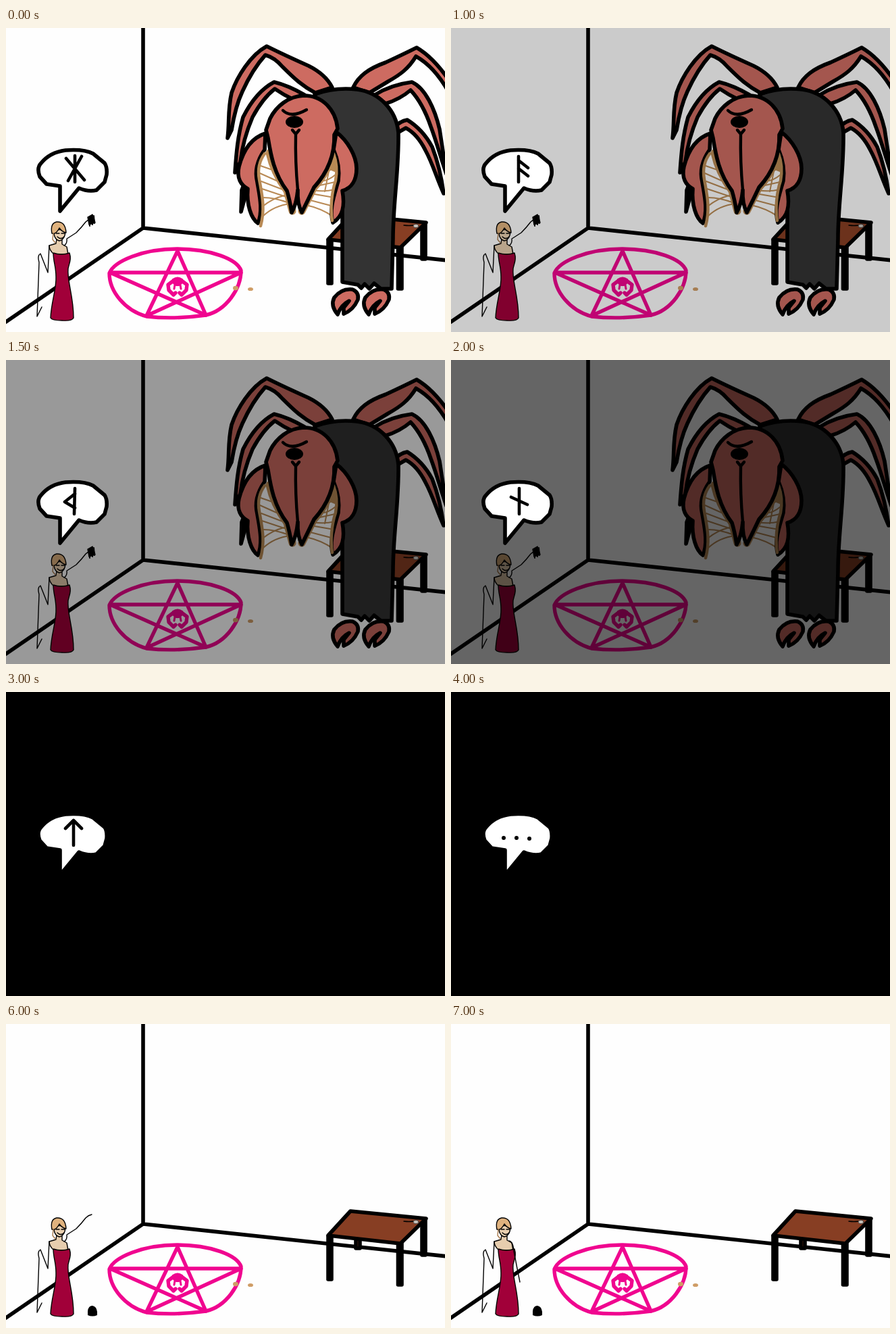
An HTML page for the animation above (8 s loop, 650 by 450 pixels).

```html
<!DOCTYPE html>
<html lang="en">
<head>
<meta charset="utf-8">
<title>Summoning room</title>
<style>
html, body { margin: 0; width: 100%; height: 100%; overflow: hidden; background: #fff; }
svg { display: block; width: 650px; height: 450px; }
path, ellipse { stroke-linecap: round; stroke-linejoin: round; }
.ink { stroke: #000; stroke-width: 5.6; fill: none; }
.thin { stroke: #000; stroke-width: 1.4; fill: none; }
.flesh { fill: #cd6b61; }
.wood { fill: #873e23; }
.pink { stroke: #f0058f; stroke-width: 5.4; fill: none; }
.web { stroke: #b98a55; stroke-width: 2; fill: none; }
.rune { stroke: #000; stroke-width: 4.6; fill: none; }

.monster, .bubble, .dim, .held, .raised, .dropped, .lowered, .rune, .dots { animation: 8s step-end infinite; }
.monster, .bubble, .held { animation-name: before6; }
.dropped { animation-name: after6; }
.raised { animation-name: before7; }
.lowered { animation-name: after7; }
.dim { animation-name: dim; }
.r1 { animation-name: r1; }
.r2 { animation-name: r2; }
.r3 { animation-name: r3; }
.r4 { animation-name: r4; }
.r5 { animation-name: r5; }
.r6 { animation-name: r6; }
.dots { animation-name: dots; }
@keyframes before6 { 0% { opacity: 1 } 75%, to { opacity: 0 } }
@keyframes after6 { 0% { opacity: 0 } 75%, to { opacity: 1 } }
@keyframes before7 { 0% { opacity: 1 } 87.5%, to { opacity: 0 } }
@keyframes after7 { 0% { opacity: 0 } 87.5%, to { opacity: 1 } }
@keyframes dim {
  0% { opacity: 0 } 12.5% { opacity: .2 } 18.75% { opacity: .4 } 25% { opacity: .6 }
  31.25% { opacity: .8 } 37.5% { opacity: 1 } 75%, to { opacity: 0 }
}
@keyframes r1 { 0% { opacity: 1 } 12.5%, to { opacity: 0 } }
@keyframes r2 { 0% { opacity: 0 } 12.5% { opacity: 1 } 18.75%, to { opacity: 0 } }
@keyframes r3 { 0% { opacity: 0 } 18.75% { opacity: 1 } 25%, to { opacity: 0 } }
@keyframes r4 { 0% { opacity: 0 } 25% { opacity: 1 } 31.25%, to { opacity: 0 } }
@keyframes r5 { 0% { opacity: 0 } 31.25% { opacity: 1 } 37.5%, to { opacity: 0 } }
@keyframes r6 { 0% { opacity: 0 } 37.5% { opacity: 1 } 50%, to { opacity: 0 } }
@keyframes dots { 0% { opacity: 0 } 50%, to { opacity: 1 } }
</style>
</head>
<body>
<svg viewBox="0 0 650 450">
  <rect width="650" height="450" fill="#fefefe"/>

  <!-- room -->
  <path class="ink" d="M203 -4V296L653 344M203 296L0 435"/>

  <!-- table -->
  <g class="ink wood">
    <path d="M518 318H524V332H518Z"/>
    <path d="M616 290H621V342H616Z"/>
    <path d="M477 314H482V378H477Z"/>
    <path d="M580.5 325H586V386H580.5Z"/>
    <path d="M510 277L622 288L584 325L477 313Z"/>
  </g>
  <path class="thin" d="M589 292Q597 293 603 292"/>
  <ellipse cx="607" cy="293" rx="4" ry="2.6" fill="#c9c4bd" stroke="#333" stroke-width=".8"/>

  <!-- circle -->
  <g class="pink">
    <path d="M153 363C160 345 203 327 253 327C303 327 342 342 348 359C348 386 326 418 296 425C268 429 236 430 208 427C176 418 153 390 153 363Z"/>
    <path d="M254 330L208 426L348 362H154L296 425Z"/>
    <path d="M248 374L240 380L241 388L248 395L251 392M260 374L268 380L267 388L260 395L257 392"/>
    <path d="M247 372Q254 367 261 372L260 378L256 381H252L248 378Z" fill="#f0058f" stroke-width="2"/>
    <path d="M250 380L249 386M258 380L259 386" stroke-width="3"/>
  </g>
  <g fill="#cf9d66">
    <ellipse cx="340" cy="385" rx="4" ry="3.2"/>
    <ellipse cx="362" cy="386.5" rx="4" ry="2.6"/>
  </g>

  <!-- woman -->
  <g class="thin">
    <path d="M75 312L74 319L64 322Q64 329 71 335H92L90 324L83 320V312Z" fill="#e6cdae"/>
    <path d="M64 322L62 362L51 334Q46 337 49 347L46 427L53 413"/>
    <path d="M70 333Q82 337 94 333C97 342 94 347 92 356C90 374 100 396 100 429Q98 434 83 433Q68 433 66 429C67 405 75 386 74 368C74 353 70 346 70 333Z" fill="#a10039"/>
    <path d="M71 298Q70 313 79 315Q88 313 88 299Z" fill="#ead0b0"/>
    <path d="M68 304Q65 289 75 287Q88 286 89 303Q83 302 79 296Q74 306 68 304Z" fill="#dfb27e"/>
    <path d="M70 304L69 313L73 318" stroke="#a87a4c"/>
    <path d="M74 304H79M82 304H87M76 309Q81 314 86 309"/>
    <path class="raised" d="M86 322Q91 319 90 312L104 303Q112 295 118 287Q122 283 127 282"/>
    <path class="lowered" d="M86 321Q92 322 93 336L98 362L102 382"/>
    <path class="held" d="M121 280L128 276L132 288L123 291Z" fill="#000"/>
    <path class="held" d="M123 281L124 293M127 279L128 291M130 278L131 289" stroke-width="2"/>
  </g>
  <path class="dropped" d="M121 431V425Q122 417 128 417Q134 418 135 426V431Q128 434 121 431Z"/>

  <g class="monster">
    <g class="ink flesh">
      <!-- left legs -->
      <path d="M483 88C476 74 464 64 448 56Q410 39 386 27C362 40 342 72 334 96C328 122 331 140 328 163L334 151C338 126 342 111 350 94Q365 61 384 40Q398 44 409 57C427 75 439 86 458 96Z"/>
      <path d="M442 99Q418 85 397 80C378 90 362 110 351 132C343 160 341 185 339 214L347 198C350 172 356 153 365 132Q380 104 398 90Q411 99 424 105Z"/>
      <path d="M355 225L349 240L348 272L354 250Z"/>
      <!-- right legs -->
      <path d="M514 88C522 71 537 60 562 51Q588 39 608 29Q632 43 655 76V94Q634 57 607 42C596 60 584 69 566 79L538 96Z"/>
      <path d="M546 99Q570 84 601 80C621 89 635 120 642 150L652 216C643 190 638 170 629 146Q617 111 599 92Q584 105 562 112Z"/>
      <path d="M574 148Q583 138 594 136Q617 150 631 176Q643 207 648 245C637 221 632 201 621 181Q609 157 592 148L578 156Z"/>
    </g>
    <!-- body -->
    <path class="ink" style="fill:#333" d="M457 98Q488 87 520 91C552 95 578 121 581 155C582 210 573 260 573 312L571 386L555 386L545 378L538 386L531 379L526 385L521 380L498 376V240Z"/>
    <!-- feet -->
    <g class="ink flesh">
      <path id="foot" d="M491 424Q480 411 486 399Q497 385 513 387Q523 391 521 402Q514 418 500 423L500 414L508 404Q496 410 491 424Z"/>
      <use href="#foot" x="46"/>
    </g>
    <!-- web -->
    <path d="M385 182Q374 196 375 222L380 260L377 291L425 270L466 250L484 285L491 215L485 182Z" fill="#fefefe"/>
    <g class="web">
      <path d="M377 204L400 212M376 215L405 228M378 227L412 240M379 238L418 251M381 251Q398 251 419 259M380 264Q395 252 412 248M381 278Q397 263 421 260"/>
      <path d="M485 205L468 222M488 217Q475 228 464 226M487 228L460 234M487 239Q470 243 455 240M486 251L451 245M485 264L447 254M484 279Q467 267 444 262M478 212L472 242"/>
      <path d="M480 186L489 196L487 212L477 208Z" fill="#b98a55"/>
      <path style="stroke-width:11" d="M390 185Q396 213 416 241L424 271M484 184Q476 214 456 236L438 271"/>
    </g>
    <!-- mandibles -->
    <g class="ink flesh">
      <path d="M384 156C362 163 351 182 345 205C341 222 348 233 358 238C356 262 363 282 373 289C381 270 375 247 372 228Q366 204 383 180Z"/>
      <path d="M489 154C505 166 519 189 519 208C519 225 512 237 498 241C502 263 499 279 484 288C478 268 486 248 492 226Q495 203 485 180Z"/>
    </g>
    <path class="web" style="stroke-width:4.5" d="M383 186Q371 202 375 224C379 247 384 267 377 293M485 186Q492 205 488 226C482 244 480 268 483 285"/>
    <!-- head -->
    <path class="ink flesh" d="M385 151L391 134C400 116 418 101 441 100C468 100 488 120 491 149L486 158C487 188 476 214 456 236Q447 255 438 273Q431 260 432 240Q430 261 423 273Q420 254 416 241C397 216 392 188 388 163Z"/>
    <path class="ink" style="stroke-width:4.4" d="M424 151L429 157L434 151M429 157Q428 198 432 240M410 122Q422 134 445 121"/>
    <ellipse cx="427" cy="139" rx="13" ry="9"/>
  </g>

  <rect class="dim" width="650" height="450"/>

  <!-- speech -->
  <g class="bubble">
    <path class="ink" style="fill:#fff" d="M80 271V234L60 231L50 220Q45 207 52 200Q65 184 88 181Q116 179 129 186L146 200Q150 206 149 217L146 228L134 240Q122 243 108 237Z"/>
    <path class="rune r1" d="M102 189V228M89 193L116 225M112 190L92 226"/>
    <path class="rune r2" d="M100 190V228M100 196L114 207M100 208L114 219"/>
    <path class="rune r3" d="M102 190L101 228M102 198L87 210L102 219"/>
    <path class="rune r4" d="M101 190V228M89 203L113 214"/>
    <path class="rune r5" d="M97 190L98 227M97 206L118 222"/>
    <path class="rune r6" d="M100 190V227M88 202L100 190L112 202"/>
    <g class="dots">
      <circle cx="78" cy="216" r="3"/>
      <circle cx="97" cy="216" r="3"/>
      <circle cx="116" cy="217" r="3"/>
    </g>
  </g>
</svg>
</body>
</html>
```
